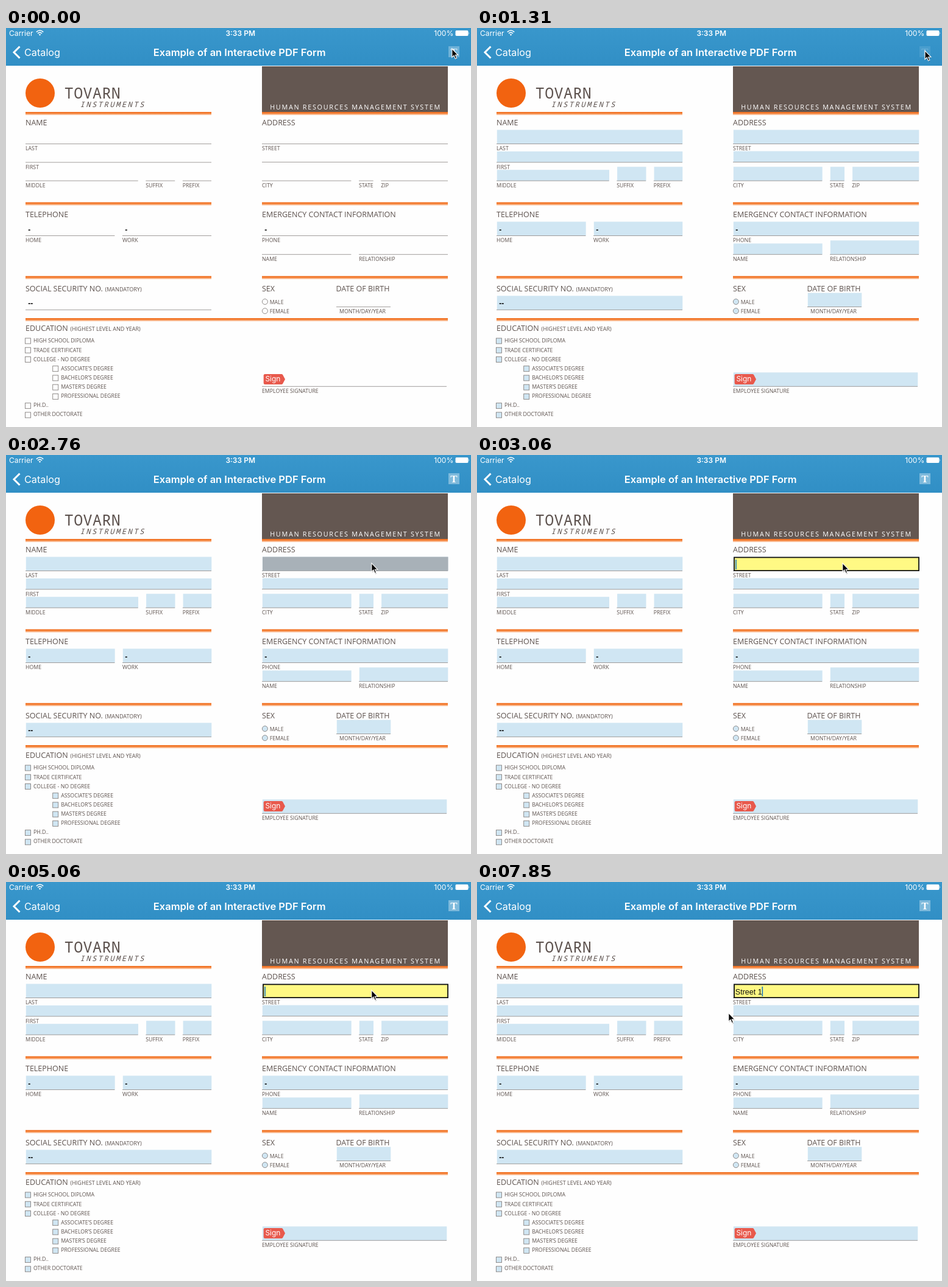
Write an HTML page that moves like this. It is 763 px wide and 656 px high and loops after 8 s.

```html
<!DOCTYPE html>
<html lang="en">
<head>
<meta charset="utf-8">
<title>Interactive form</title>
<style>
  html, body { margin: 0; width: 100%; height: 100%; overflow: hidden; background: #fefefe; }
  svg { display: block; width: 100vw; height: 100vh; }
  text { white-space: pre; }
  .head, .label, .note, .banner { font-family: "Open Sans", "Noto Sans", sans-serif; fill: #5d524e; }
  .head { font-size: 12.5px; }
  .label { font-size: 8.75px; }
  .note { font-size: 9.05px; }
  .banner { font-size: 10.8px; letter-spacing: 1.72px; fill: #fff; }
  .ui { font-family: Inter, Roboto, sans-serif; fill: #fff; }
  .brand { font-family: "Noto Sans Mono", monospace; fill: #5d524e; }
  .entry { font-family: "Liberation Sans", Arial, sans-serif; font-size: 12.55px; fill: #111; }
  .dash { font-weight: bold; font-size: 12px; fill: #000; }
</style>
</head>
<body>
<svg viewBox="0 0 763 656" preserveAspectRatio="none">
  <defs>
    <linearGradient id="sky" x2="0" y2="1">
      <stop offset="0" stop-color="#3997cc"/><stop offset="1" stop-color="#318fc5"/>
    </linearGradient>
    <linearGradient id="rule" x2="0" y2="1">
      <stop offset="0" stop-color="#f06a18"/><stop offset=".5" stop-color="#f58a45"/>
      <stop offset="1" stop-color="#fef3ec"/>
    </linearGradient>
    <path id="arrow" d="M0 0V14.2L3.2 11.2L5.5 16.6L7.8 15.7L5.6 10.4H9.9Z"/>
  </defs>

  <rect width="763" height="62" fill="url(#sky)"/>
  <g class="ui">
    <text x="5" y="12.5" font-size="12.1">Carrier</text>
    <text x="384.7" y="12.5" font-size="12" font-weight="600" text-anchor="middle">3:33 PM</text>
    <text x="734.3" y="12.5" font-size="12.1" text-anchor="end">100%</text>
    <text x="30" y="46" font-size="16.2">Catalog</text>
    <text x="383.2" y="46" font-size="16.5" font-weight="600" text-anchor="middle">Example of an Interactive PDF Form</text>
  </g>
  <g fill="none" stroke="#fff">
    <path d="M49.8 6.6Q55.5 1.4 61.2 6.6M52 9Q55.5 5.8 59 9" stroke-width="1.6"/>
    <path d="M53.6 10.6Q55.5 9.2 57.4 10.6L55.5 12.7Z" fill="#fff" stroke="none"/>
    <path d="M22.5 30.5L13 40L22.5 49.5" stroke-width="3"/>
  </g>
  <rect x="737.5" y="4" width="21" height="9" rx="1.8" fill="#fff"/>
  <path d="M759.4 6.7Q761 8.5 759.4 10.3Z" fill="#fff"/>
  <g id="tool">
    <rect x="726" y="30" width="18" height="18" fill="#fff" opacity=".36"/>
    <text x="735" y="45" font-family="Liberation Serif, serif" font-size="17" font-weight="bold" fill="#fff" text-anchor="middle">T</text>
  </g>

  <circle cx="56" cy="107" r="24" fill="#f26310"/>
  <text class="brand" x="95.8" y="116" font-size="25" letter-spacing=".4">TOVARN</text>
  <text class="brand" x="121.5" y="129.5" font-size="12.2" font-weight="500" font-style="italic" letter-spacing="2.45">INSTRUMENTS</text>
  <rect x="420" y="63" width="305" height="75" fill="#645751"/>
  <text class="banner" x="433.2" y="133.6">HUMAN RESOURCES MANAGEMENT SYSTEM</text>

  <g id="rules" fill="url(#rule)"></g>
  <g id="tints" fill="#d0e6f3"></g>
  <g id="lines" stroke="#989391" stroke-width=".9"></g>
  <g id="boxes" stroke="#85817f" stroke-width=".9"></g>
  <g id="labels"></g>

  <path d="M425 569H452Q453.3 569 454 570L458 577.5L454 585Q453.3 586 452 586H425Q422.7 586 422.7 583.7V571.3Q422.7 569 425 569Z" fill="#e8594c"/>
  <text class="ui" x="425.4" y="581.3" font-size="12">Sign</text>

  <rect id="press" x="421" y="167.5" width="304.5" height="23" fill="#a8b1b8"/>
  <g id="focus">
    <rect x="422" y="168.4" width="303" height="21.7" fill="#fff984" stroke="#111" stroke-width="1.8"/>
    <text id="typed" class="entry" x="423.8" y="184.6"></text>
    <rect id="caret" y="172" width="1.8" height="16" fill="#2d80b8"/>
  </g>
  <g id="pointer">
    <use href="#arrow" x=".9" y="1.5" opacity=".22"/>
    <use href="#arrow" stroke="#fff" stroke-width="1.1"/>
  </g>
</svg>

<script>
const $ = id => document.getElementById(id);
const add = (id, markup) => { $(id).innerHTML += markup; };
const text = (kind, x, y, s) => add('labels', `<text class="${kind}" x="${x}" y="${y}">${s}</text>`);

const LEFT = 32, RIGHT = 420, WIDTH = 305, GAP = 12.6, HALF = 159;

function heading(x, y, title, note, noteX) {
  text('head', x, y, title);
  if (note) text('note', noteX, y, note);
}

function rule(y, x, width = WIDTH) {
  add('rules', `<rect x="${x}" y="${y}" width="${width}" height="5.6"/>`);
}

// A cell is [label, offset, height, text]; it reaches to a gap before the next cell.
function row(x, base, cells, width = WIDTH) {
  cells.forEach(([label, offset = 0, height = 23, value = ''], i) => {
    const next = cells[i + 1], start = x + offset;
    const end = next ? x + next[1] - GAP : x + width;
    add('tints', `<rect x="${start + .8}" y="${base - height}" width="${end - start - .5}" height="${height}"/>`);
    add('lines', `<path d="M${start} ${base}H${end}"/>`);
    text('label', start, base + 10.8, label);
    text('entry dash', start + 4.3, base - 6, value);
  });
}

for (const y of [138, 286.5, 407.8]) [LEFT, RIGHT].forEach(x => rule(y, x));
rule(477, LEFT, RIGHT + WIDTH - LEFT);

heading(LEFT, 159.6, 'NAME');
row(LEFT, 190.5, [['LAST']]);
row(LEFT, 220.9, [['FIRST', 0, 18]]);
row(LEFT, 251.2, [['MIDDLE', 0, 18], ['SUFFIX', 197.3], ['PREFIX', 257.8]]);

heading(RIGHT, 159.6, 'ADDRESS');
row(RIGHT, 190.5, [['STREET']]);
row(RIGHT, 220.5, [['', 0, 18]]);
row(RIGHT, 251.2, [['CITY'], ['STATE', HALF], ['ZIP', 195.3]]);

heading(LEFT, 310.7, 'TELEPHONE');
row(LEFT, 341.5, [['HOME', 0, 23, '-'], ['WORK', HALF, 23, '-']]);

heading(RIGHT, 310.7, 'EMERGENCY CONTACT INFORMATION');
row(RIGHT, 341.5, [['PHONE', 0, 23, '-']]);
row(RIGHT, 372.3, [['NAME', 0, 18], ['RELATIONSHIP', HALF]]);

heading(LEFT, 432.7, 'SOCIAL SECURITY NO.', '(MANDATORY)', 162.5);
row(LEFT, 463.4, [['', 0, 23, '--']]);

heading(RIGHT, 432.7, 'SEX');
['MALE', 'FEMALE'].forEach((name, i) => {
  const y = 450 + i * 15.2;
  add('boxes', `<circle cx="424.9" cy="${y}" r="4.5"/>`);
  text('label', 432.7, y + 3.5, name);
});

heading(541.5, 432.7, 'DATE OF BIRTH');
row(542, 458.5, [['']], 89);
text('label', 547, 468.6, 'MONTH/DAY/YEAR');

heading(LEFT, 498.3, 'EDUCATION', '(HIGHEST LEVEL AND YEAR)', 105.5);
const degrees = ['HIGH SCHOOL DIPLOMA', 'TRADE CERTIFICATE', 'COLLEGE - NO DEGREE',
  'ASSOCIATE’S DEGREE', 'BACHELOR’S DEGREE', 'MASTER’S DEGREE', 'PROFESSIONAL DEGREE',
  'PH.D..', 'OTHER DOCTORATE'];
degrees.forEach((name, i) => {
  const indent = i > 2 && i < 7 ? 45.2 : 0;
  add('boxes', `<rect x="${31.5 + indent}" y="${510 + i * 15.23}" width="9" height="9"/>`);
  text('label', 45 + indent, 517.4 + i * 15.1, name);
});

row(RIGHT, 589.3, [['EMPLOYEE SIGNATURE']], 303);

const LOOP = 8000, ENTRY = 'Street 1', BLINK = 970;
const keyTimes = [5700, 5870, 6050, 6110, 6340, 6840, 7260, 7500];
const moves = [
  { start: 600, step: 60, count: 2, from: [731.8, 34], to: [735, 37.3] },
  { start: 1310, step: 69, count: 8, from: [735, 37.3], to: [599.8, 177.8] },
  { start: 7500, step: 70, count: 5, from: [599.8, 177.8], to: [412.8, 215.3] }
];

const clamp = v => Math.max(0, Math.min(1, v));
const steps = (t, start, step, count) => clamp(Math.floor((t - start) / step) / count);
const ease = p => p * p * (3 - 2 * p);

function pointerAt(t) {
  const { start, step, count, from, to } = moves.filter(m => t >= m.start).pop() || moves[0];
  const p = ease(steps(t, start, step, count));
  return from.map((v, i) => v + (to[i] - v) * p);
}

// The caret fades in on focus, then blinks until the first key.
function caretAt(t) {
  if (t >= keyTimes[0]) return 1;
  if (t < 3530) return steps(t, 2880, 60, 3);
  const phase = (t - 3530) % BLINK;
  return phase < 410 ? 1 - steps(phase, -60, 60, 3) : steps(phase, 350, 60, 3);
}

const toolAt = t => t < 1140 ? .8 : .28 + .72 * steps(t, 1310, 60, 4);
const show = (id, on) => $(id).setAttribute('visibility', on ? 'visible' : 'hidden');

function render(t) {
  const lit = t >= 1310;
  show('tints', lit);
  $('boxes').setAttribute('fill', lit ? '#d0e6f3' : '#fefefe');
  $('tool').setAttribute('opacity', toolAt(t));
  show('press', t >= 2760 && t < 2940);
  show('focus', t >= 2940);

  const typed = $('typed'), count = keyTimes.filter(k => t >= k).length;
  typed.textContent = ENTRY.slice(0, count);
  $('caret').setAttribute('x', 424 + (count ? typed.getComputedTextLength() - .6 : 0));
  $('caret').setAttribute('opacity', caretAt(t));
  $('pointer').setAttribute('transform', `translate(${pointerAt(t)})`);
}

const begin = performance.now();
function tick() {
  render((performance.now() - begin) % LOOP);
  requestAnimationFrame(tick);
}
tick();
</script>
</body>
</html>
```
